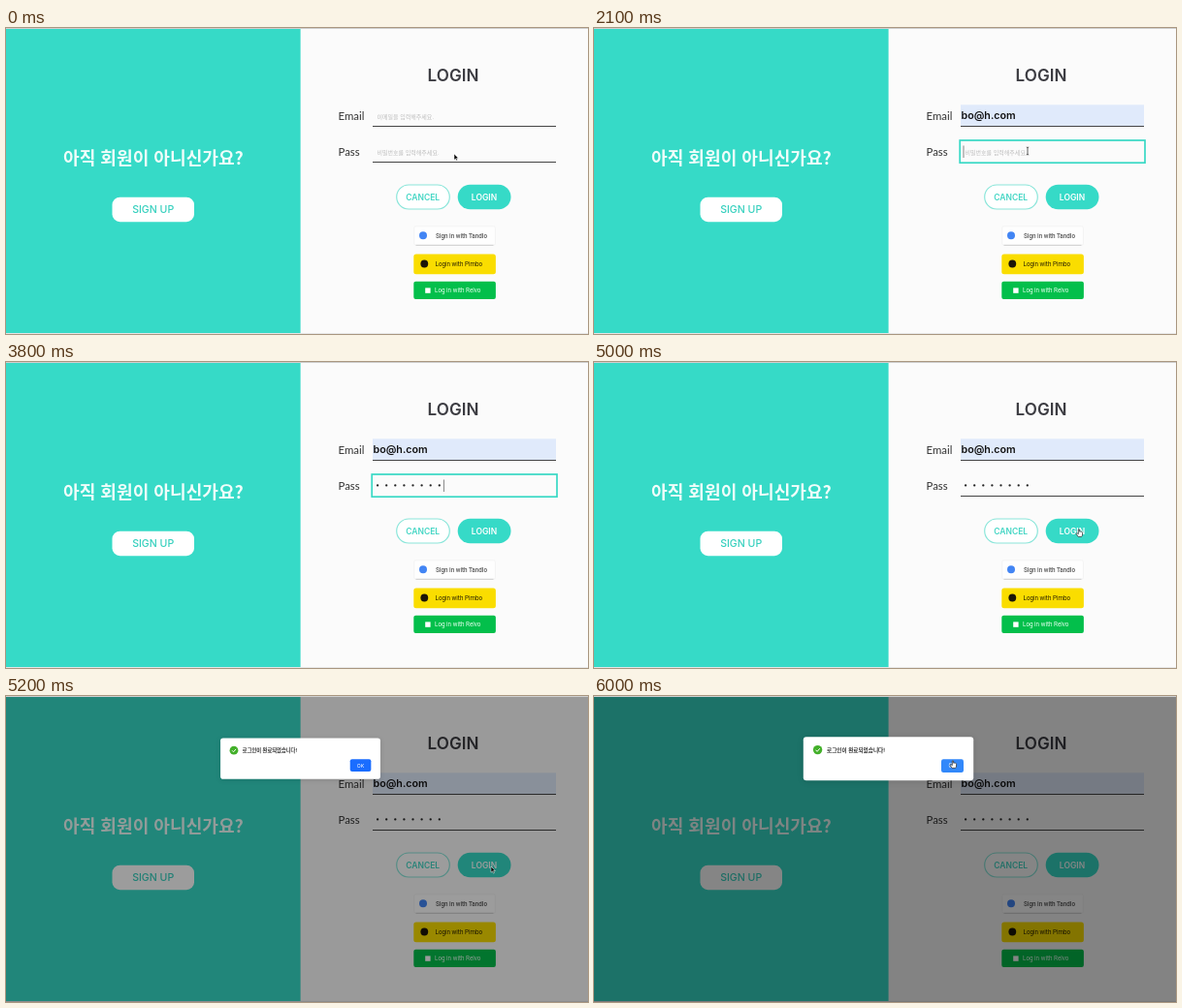
Write an HTML page that moves like this. It is 600 px wide and 316 px high and loops after 6100 ms.

```html
<!DOCTYPE html>
<html lang="ko">
<head>
<meta charset="utf-8">
<title>Login</title>
<style>
  html, body { margin: 0; width: 100%; height: 100%; overflow: hidden; background: #fbfbfb; }
  svg { display: block; width: 100vw; height: 100vh; font-family: Inter, "Noto Sans CJK KR", sans-serif; }
  .ko { font-family: "Noto Sans CJK KR", "Noto Sans CJK", sans-serif; }
  .lato { font-family: Lato, sans-serif; }
  .rob { font-family: Roboto, sans-serif; }
  .hint { font-size: 6px; fill: #bdbdbd; }
  .btn { font-size: 8.5px; font-weight: 600; text-anchor: middle; }
  .label { font-size: 11.4px; fill: #333; }
  .line { stroke: #444; stroke-width: 1; }
  .ring { stroke: #38d9c5; stroke-width: 1.7; }
  .social { font-size: 6.3px; }
  .medium { font-size: 5.6px; stroke-width: .18; }
  .pop { filter: drop-shadow(0 1px 1.5px rgba(0, 0, 0, .3)); }
  .box { filter: drop-shadow(0 1px 3px rgba(0, 0, 0, .12)); }
</style>
</head>
<body>
<svg viewBox="0 0 600 316" preserveAspectRatio="none">
  <rect width="600" height="316" fill="#fbfbfb"/>
  <rect width="303.6" height="316" fill="#36dac7"/>
  <rect y="315" width="600" height="1" fill="#e5e5e5"/>
  <text class="ko" x="59" y="140.6" font-size="18.1" font-weight="700" fill="#f0fdfa">아직 회원이 아니신가요?</text>
  <rect x="109.5" y="174.7" width="84.5" height="25.5" rx="8" fill="#fff"/>
  <text x="151.7" y="191.3" font-size="10.6" font-weight="500" text-anchor="middle" fill="#36d0be">SIGN UP</text>

  <g id="upper">
    <text x="461" y="54.5" font-size="17.1" font-weight="600" text-anchor="middle" fill="#3c3c42">LOGIN</text>
    <text class="label lato" x="342.5" y="95.1">Email</text>
    <rect id="mailFill" x="378" y="79.3" width="189" height="22.2" fill="#e0eafb"/>
    <text id="mailHint" class="hint ko" x="382.5" y="94">이메일을 입력해주세요.</text>
    <text id="mail" x="378.5" y="94.3" fill="#111"/>
    <path class="line" d="M378 101.5H567"/>
    <rect id="mailRing" class="ring" x="377.2" y="79.2" width="190.8" height="23" fill="none"/>
    <path id="mailCaret" d="M380.5 86V96" stroke="#555" stroke-width=".7"/>

    <text class="label lato" x="342.5" y="132.1">Pass</text>
    <text id="passHint" class="hint ko" x="382.5" y="131">비밀번호를 입력해주세요.</text>
    <path id="passLine" class="line" d="M378 138.5H567"/>
    <rect id="passRing" class="ring" x="377.2" y="116" width="190.8" height="23.2" fill="none"/>
    <g id="dots" fill="#222"></g>
    <path id="passCaret" d="M0 121.5V134" stroke="#555" stroke-width=".7"/>
    <text id="warn" class="ko medium" x="382.5" y="150.7" fill="#51349c" stroke="#51349c">비밀번호는 영문, 숫자, 특수문자를 포함한 8자리 이내로 입력해주세요</text>
  </g>

  <g id="lower">
    <rect x="402.7" y="162" width="54.6" height="25" rx="12.5" fill="#fff" stroke="#8be6da" stroke-width="1.2"/>
    <text class="btn" x="429.7" y="177.7" fill="#45d6c5">CANCEL</text>
    <rect x="465.7" y="161.7" width="54.8" height="25.6" rx="12.8" fill="#36dac7"/>
    <text class="btn" x="493" y="177.7" fill="#fff">LOGIN</text>

    <rect x="420.8" y="204.8" width="83.6" height="19.4" rx="1.5" fill="#fefefe" stroke="#efefef" stroke-width=".7"/>
    <path d="M422.5 224.3H502.5" stroke="#c4c4c4" stroke-width=".8"/>
    <circle cx="430" cy="214.3" r="4" fill="#4285f4"/>
    <text class="social rob" x="443" y="216.6" font-weight="500" fill="#555">Sign in with Tandlo</text>
    <rect x="420.3" y="233.4" width="84.6" height="20.8" rx="2.5" fill="#fadd00"/>
    <circle cx="431.3" cy="243.5" r="3.9" fill="#1c1608"/>
    <text class="social rob" x="442.5" y="246.2" fill="#2a2200">Login with Pimbo</text>
    <rect x="420.3" y="261.7" width="84.6" height="18.3" rx="2" fill="#03bf4b"/>
    <rect x="432.2" y="268.4" width="5.4" height="5.4" fill="#fff"/>
    <text class="social rob" x="442" y="273.2" fill="#e9fff0">Log in with Relvo</text>
  </g>

  <g id="list">
    <path class="pop" d="M420 106H425.5L428 103.2L430.5 106H479Q480 106 480 107V199Q480 200 479 200H420Q419 200 419 199V107Q419 106 420 106Z" fill="#fff"/>
    <rect id="hover" x="419" width="61" height="15.1" fill="#dadada"/>
    <g id="rows" font-size="5.5" fill="#222"></g>
  </g>

  <rect id="mask" width="600" height="316" fill="#000"/>
  <rect width="600" height="1" fill="#cfcfcf"/>
  <g id="modal">
    <rect class="box" x="215.8" y="42.2" width="175.4" height="45" rx="3" fill="#fff"/>
    <circle cx="230.6" cy="55.6" r="4.7" fill="#43b02a"/>
    <path d="M228.5 55.7L230.1 57.3L232.8 54.2" fill="none" stroke="#fff" stroke-width="1"/>
    <text class="ko medium" x="240" y="57.7" fill="#222" stroke="#222">로그인이 완료되었습니다!</text>
    <rect id="ok" x="358" y="65.3" width="23" height="13.6" rx="2.2" fill="#1a6dff"/>
    <text x="369.5" y="74.1" font-size="5.6" text-anchor="middle" fill="#fff">OK</text>
  </g>

  <g id="pointer">
    <path id="arrow" d="M0 0V6.2L1.5 4.9L2.5 7.1L3.5 6.6L2.5 4.5H4.4Z" fill="#000" stroke="#fff" stroke-width=".5"/>
    <path id="beam" d="M-1.2 -4Q0 -4 0 -3Q0 -4 1.2 -4M0 -3V3M-1.2 4Q0 4 0 3Q0 4 1.2 4" fill="none" stroke="#333" stroke-width=".8"/>
    <path id="hand" d="M-.7 -3Q0 -3.8 .6 -3V-.8Q1.2 -1.4 1.8 -.7Q2.4 -1.1 2.9 -.4Q3.6 -.5 3.6 .5V2Q3.5 3.6 2.6 4.4H-.8Q-2 3.2 -2.9 1.3Q-2.7 .3 -1.6 1L-.7 1.7Z" fill="#fff" stroke="#222" stroke-width=".7"/>
  </g>
</svg>
<script>
const LOOP = 6100, TICK = 100, SHIFT = 3.6, DIM = .48;
const SVG = "http://www.w3.org/2000/svg";
const address = "bo@h.com";
const contacts = ["wow@w.test", address, "wow@h.com", "4750@bo.test", "w@h.com", "wow@wo.test"];
const typedAt = [2200, 2400, 2600, 2800, 3000, 3300, 3400, 3800];

// time, x, y of the pointer tip
const path = [
  [0, 462, 130], [100, 458, 124], [300, 436, 93], [600, 432, 92],
  [800, 441, 113], [1000, 456, 127], [1200, 459, 131], [1400, 459, 131],
  [1700, 452, 127], [2100, 447, 127], [4300, 450, 131], [4800, 500, 176],
  [5400, 500, 176], [5800, 376, 74], [5900, 370, 70], [6100, 370, 70]
];

const el = {};
document.querySelectorAll("[id]").forEach(n => el[n.id] = n);
const show = (n, on) => n.style.display = on ? "" : "none";
const between = (t, a, b) => t >= a && t < b;

function add(parent, tag, attrs, text = "") {
  const n = document.createElementNS(SVG, tag);
  for (const k in attrs) n.setAttribute(k, attrs[k]);
  n.textContent = text;
  parent.append(n);
  return n;
}

contacts.forEach((c, i) => add(el.rows, "text", { x: 424, y: 117 + i * 15.1 }, c));
const dots = typedAt.map((_, i) => add(el.dots, "circle", { cx: 383.1 + i * 9.1, cy: 127.4, r: 1.15 }));

function pointerAt(t) {
  const i = Math.max(1, path.findIndex(p => p[0] > t));
  const a = path[i - 1], b = path[i];
  const k = (t - a[0]) / (b[0] - a[0]);
  return [a[1] + (b[1] - a[1]) * k, a[2] + (b[2] - a[2]) * k];
}

function pointerKind(t, x, y) {
  if (between(t, 2200, 4300)) return "none";
  if (t >= 5100) return t >= 5800 ? "hand" : "arrow";
  if (between(t, 800, 1500) || t < 100) return "arrow";
  if (x > 466 && y > 162) return "hand";
  return between(y, 79, 102) || between(y, 116, 139) ? "beam" : "arrow";
}

function drawForm(t) {
  const picked = t >= 1400, mailFocus = between(t, 400, 1800);
  const row = between(t, 800, 1000) ? 0 : between(t, 1000, 1400) ? 1 : -1;
  const value = picked ? address : row < 0 ? "" : contacts[row];
  el.mail.textContent = value;
  el.mail.setAttribute("font-size", picked ? 10.7 : 5.4);
  el.mail.setAttribute("font-weight", picked ? 600 : 500);
  show(el.mailHint, !value);
  show(el.mailFill, value);
  show(el.mailRing, mailFocus);
  show(el.mailCaret, mailFocus && !value);
  show(el.list, between(t, 500, 1400));
  show(el.hover, row >= 0);
  el.hover.setAttribute("y", 107.4 + Math.max(row, 0) * 15.1);

  const count = typedAt.filter(x => t >= x).length;
  const passFocus = between(t, 1800, 4800);
  const warned = between(t, 2200, 3800);
  dots.forEach((d, i) => show(d, i < count));
  show(el.passHint, !count);
  show(el.passLine, !passFocus);
  show(el.passRing, passFocus);
  show(el.passCaret, passFocus);
  el.passCaret.setAttribute("transform", `translate(${(count ? 378.8 : 381) + count * 9.08} 0)`);
  show(el.warn, warned);
  el.upper.setAttribute("transform", `translate(0 ${warned ? -SHIFT : 0})`);
  el.lower.setAttribute("transform", `translate(0 ${warned ? SHIFT : 0})`);
}

function drawModal(t) {
  const k = Math.min(1, Math.max(0, (t - 5000) / 300));
  const scale = 1 - .54 * (1 - k) ** 2;
  el.mask.setAttribute("opacity", DIM * (1 - (1 - k) ** 1.5));
  show(el.modal, k > 0);
  el.modal.setAttribute("opacity", Math.min(1, k * 1.5));
  el.modal.setAttribute("transform", `translate(303.5 64.7) scale(${scale}) translate(-303.5 -64.7)`);
  el.ok.setAttribute("fill", t >= 5800 ? "#3288fa" : "#1a6dff");
}

function drawPointer(t) {
  const [x, y] = pointerAt(t), kind = pointerKind(t, x, y);
  for (const k of ["arrow", "beam", "hand"]) show(el[k], k === kind);
  el.pointer.setAttribute("transform", `translate(${x} ${y})`);
}

const start = performance.now();
function frame(now) {
  const t = Math.floor(Math.max(0, now - start) % LOOP / TICK) * TICK;
  drawForm(t);
  drawModal(t);
  drawPointer(t);
  requestAnimationFrame(frame);
}
frame(start);
</script>
</body>
</html>
```
